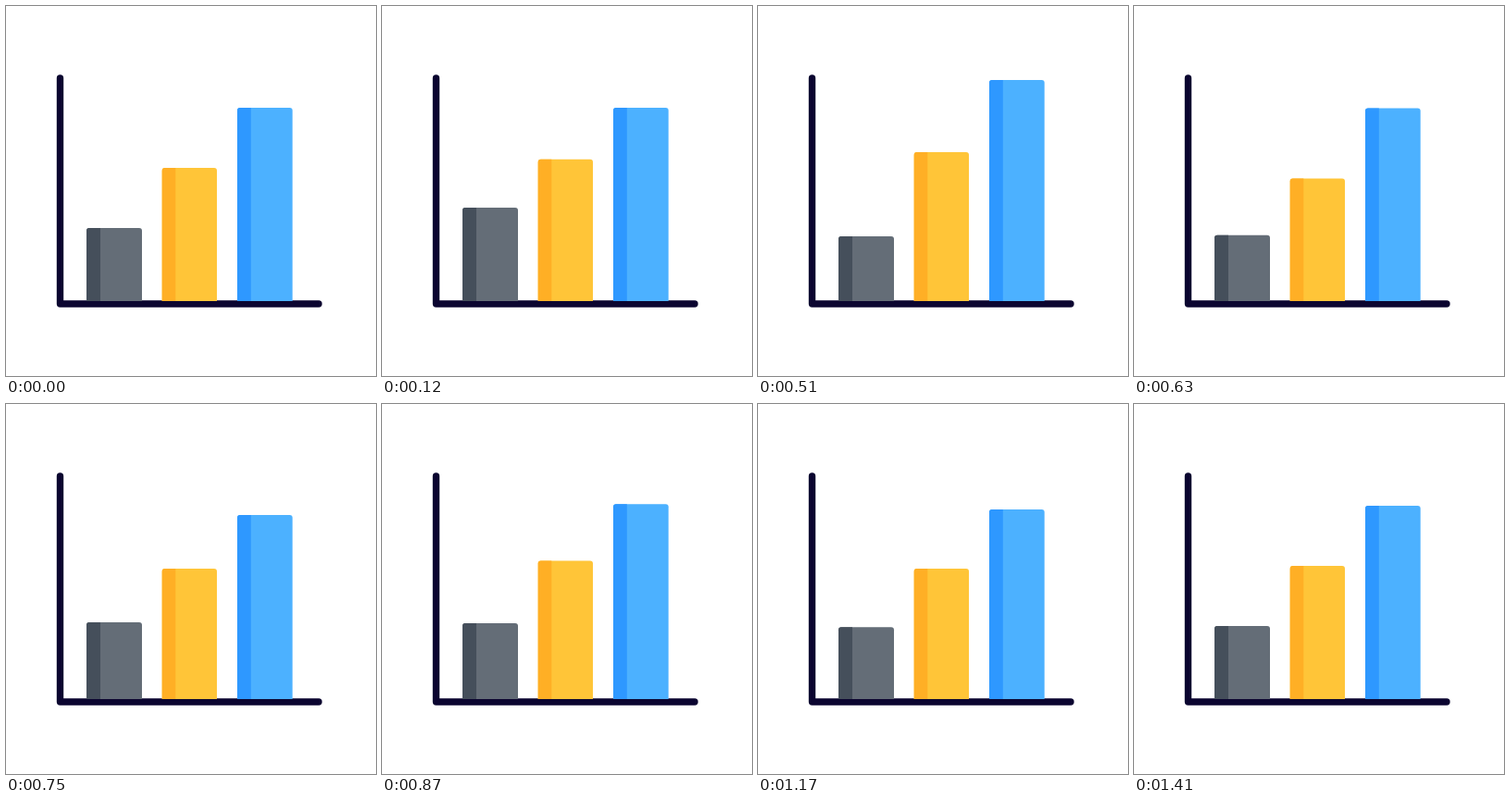
An HTML page that plays this animation: 400 px wide and 400 px high, repeating every 2440 ms.

```html
<!DOCTYPE html>
<html lang="en">
<head>
<meta charset="utf-8">
<title>Bar chart</title>
<style>
html, body { margin: 0; width: 100%; height: 100%; overflow: hidden; background: #fff; }
svg { display: block; width: 100%; height: 100%; }
</style>
</head>
<body>
<svg viewBox="0 0 400 400">
  <path d="M58.5 78V322H338" fill="none" stroke="#0b0530" stroke-width="7.4" stroke-linecap="round" stroke-linejoin="round"/>
  <g id="bars"></g>
</svg>
<script>
const LOOP = 2440, STEP = 30, BASE = 319, RADIUS = 3;

// Spring offset of a bar's top: [ms after its start, px]
const SPRING = [
  [0, 0], [45, -9.3], [120, -22], [150, -27], [225, -31], [270, -32.2], [300, -32],
  [360, -30], [390, -26], [435, -17], [510, 9], [550, 11.5], [600, 10], [675, 3],
  [750, -4], [800, -5.5], [840, -5], [915, 1], [990, 4], [1020, 4], [1260, 0]
];

const BARS = [
  { left: 87, split: 102, right: 147, top: 240, delay: 0, dark: '#454f5b', light: '#646d77' },
  { left: 168.7, split: 183.3, right: 228, top: 175, delay: 75, dark: '#ffaf25', light: '#ffc538' },
  { left: 250, split: 264.8, right: 309.7, top: 110, delay: 150, dark: '#2e98ff', light: '#4cb1ff' }
];

const slope = (a, b) => (b[1] - a[1]) / (b[0] - a[0]);

// Tangent that never overshoots the table's own peaks
function tangent(i) {
  if (i === 0) return slope(SPRING[0], SPRING[1]);
  if (i === SPRING.length - 1) return 0;
  const a = slope(SPRING[i - 1], SPRING[i]), b = slope(SPRING[i], SPRING[i + 1]);
  return a * b <= 0 ? 0 : 2 * a * b / (a + b);
}

function spring(t) {
  if (t <= 0 || t >= SPRING[SPRING.length - 1][0]) return 0;
  const i = SPRING.findIndex(p => p[0] > t) - 1;
  const [t0, y0] = SPRING[i], [t1, y1] = SPRING[i + 1];
  const h = t1 - t0, u = (t - t0) / h, v = 1 - u;
  return v * v * (1 + 2 * u) * y0 + u * u * (3 - 2 * u) * y1
    + h * u * v * (v * tangent(i) - u * tangent(i + 1));
}

function addPath(fill) {
  const path = document.createElementNS('http://www.w3.org/2000/svg', 'path');
  path.setAttribute('fill', fill);
  document.getElementById('bars').append(path);
  return path;
}

for (const bar of BARS) {
  bar.body = addPath(bar.light);
  bar.side = addPath(bar.dark);
}

function draw(time) {
  const t = Math.floor(time % LOOP / STEP) * STEP;
  for (const b of BARS) {
    const y = b.top + spring(Math.min(t, 1410) - b.delay), r = RADIUS;
    const corner = `M${b.left} ${BASE}V${y + r}q0 ${-r} ${r} ${-r}`;
    b.body.setAttribute('d', `${corner}H${b.right - r}q${r} 0 ${r} ${r}V${BASE}Z`);
    b.side.setAttribute('d', `${corner}H${b.split}V${BASE}Z`);
  }
}

const start = performance.now();
function tick() {
  draw(performance.now() - start);
  requestAnimationFrame(tick);
}
tick();
</script>
</body>
</html>
```
